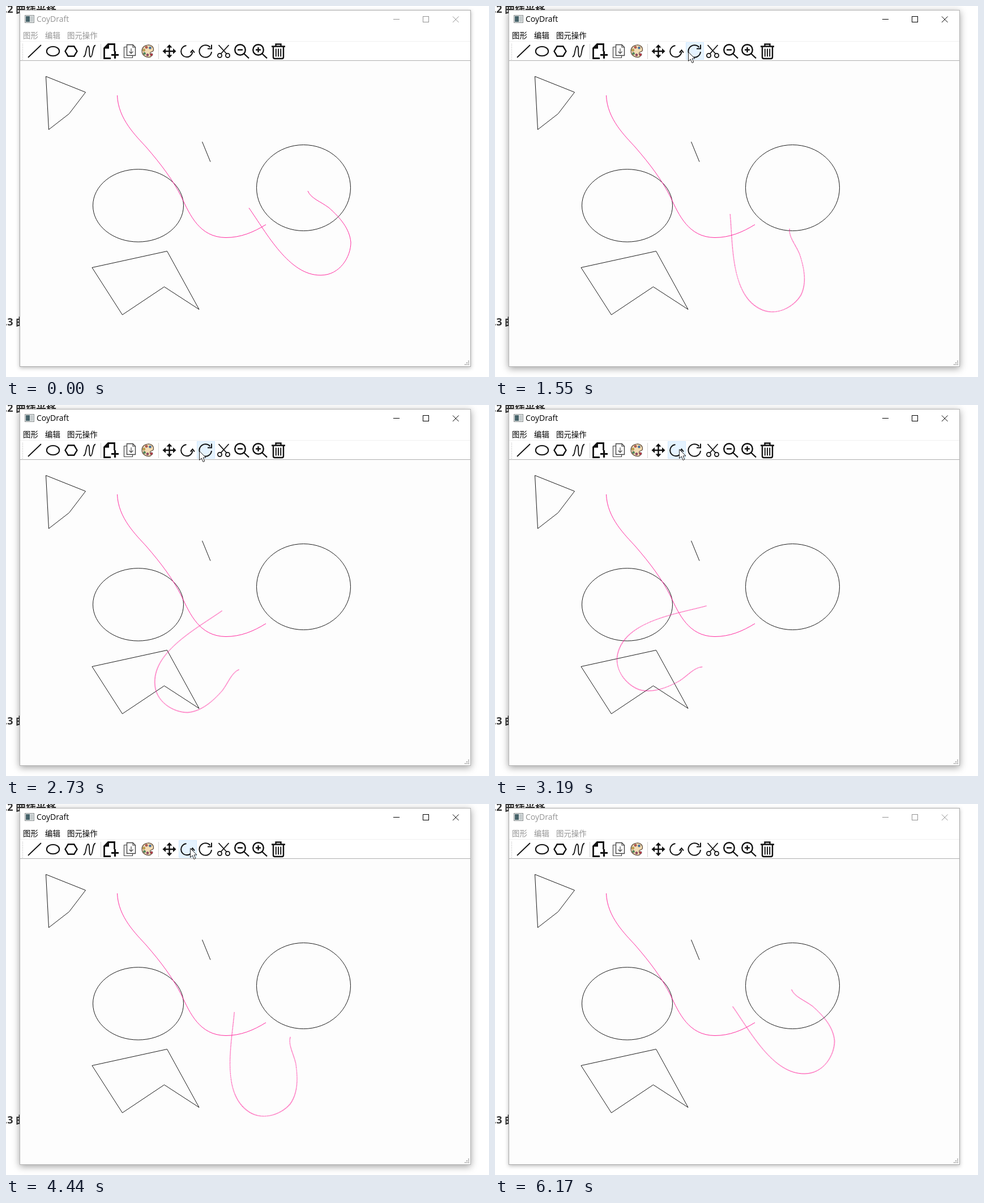
Write an HTML page that moves like this. It is 853 px wide and 656 px high and loops after 6250 ms.

```html
<!DOCTYPE html>
<html lang="zh-CN">
<head>
<meta charset="utf-8">
<title>CoyDraft</title>
<style>
  html, body { margin: 0; width: 100%; height: 100%; overflow: hidden; background: #fff; }
  body { position: relative; font-family: "Open Sans", "Noto Sans CJK SC", "Noto Sans CJK", sans-serif; }
  svg { position: absolute; left: 0; top: 0; display: block; }
  .win {
    position: absolute; left: 24px; top: 7px; width: 795px; height: 629px;
    background: #fff; border: 1px solid #aaa;
  }
  .heading { font-size: 18px; font-weight: 700; fill: #333; }
  .title { font-size: 14px; }
  .menu { font-size: 13.4px; }
  .label { fill: currentColor; }
  .caption { stroke: currentColor; fill: none; shape-rendering: crispEdges; }
  .icons { fill: none; stroke: #111; stroke-width: 2; }
  .solid { fill: #111; stroke: none; }
  .drawing { fill: none; stroke: #000; stroke-width: .9; }
  .pink { stroke: #ff1493; }

  .win, .chrome, .turn, .back, .hover, .press, .cursor {
    animation-duration: 6.25s;
    animation-timing-function: step-end;
    animation-iteration-count: infinite;
  }
  .win { animation-name: lift; }
  .chrome { animation-name: focus; }
  .turn { animation-name: turn; transform-origin: 402px 336.7px; }
  .back { animation-name: back; transform-origin: 397.6px 340.4px; }
  .hover { animation-name: hover; }
  .press { animation-name: press; }
  .cursor { animation-name: cursor; }

  @keyframes lift {
    0%, 98.72% { border-color: #aaa; box-shadow: 0 2px 7px rgba(0,0,0,.27); }
    12.48% { border-color: #b4b4b4; box-shadow: 0 3px 12px rgba(0,0,0,.38); }
  }
  @keyframes focus {
    0%, 98.72% { color: #949494; }
    12.48% { color: #000; }
  }
  /* eleven clockwise clicks, then eleven the other way */
  @keyframes turn {
    0% { transform: rotate(0deg); }
    16.16% { transform: rotate(10deg); }
    21.12% { transform: rotate(20deg); }
    24.8% { transform: rotate(30deg); }
    28.64% { transform: rotate(40deg); }
    31.04% { transform: rotate(50deg); }
    33.44% { transform: rotate(60deg); }
    36% { transform: rotate(70deg); }
    38.72% { transform: rotate(80deg); }
    43.68% { transform: rotate(90deg); }
    47.36% { transform: rotate(100deg); }
    49.92%, 100% { transform: rotate(110deg); }
  }
  @keyframes back {
    0% { transform: rotate(0deg); }
    54.88% { transform: rotate(-10deg); }
    57.28% { transform: rotate(-20deg); }
    59.68% { transform: rotate(-30deg); }
    62.4% { transform: rotate(-40deg); }
    65.92% { transform: rotate(-50deg); }
    68.64% { transform: rotate(-60deg); }
    71.04% { transform: rotate(-70deg); }
    73.6% { transform: rotate(-80deg); }
    78.4% { transform: rotate(-90deg); }
    80.96% { transform: rotate(-100deg); }
    84.8%, 100% { transform: rotate(-110deg); }
  }
  @keyframes hover {
    0%, 85.92%, 100% { transform: translate(-60px, 0); }
    11.2% { transform: translate(337px, 64px); }
    51.04% { transform: translate(305px, 64px); }
  }
  @keyframes press {
    0%, 16.16%, 21.12%, 24.8%, 31.04%, 33.44%, 36%, 38.72%, 43.68%, 47.36%, 49.92%,
    54.88%, 57.28%, 59.68%, 62.4%, 71.04%, 73.6%, 78.4%, 80.96%, 84.8%, 100% { visibility: hidden; }
    13.6%, 18.56%, 22.24%, 25.92%, 32.32%, 34.72%, 37.44%, 40%, 44.96%, 48.64%,
    53.6%, 56%, 58.56%, 61.12%, 63.52%, 72.32%, 74.72%, 79.68%, 82.24% { visibility: visible; }
  }
  @keyframes cursor {
    0%, 89.76%, 100% { transform: translate(-60px, 0); }
    2.4% { transform: translate(658px, 486px); }
    3.68% { transform: translate(630px, 440px); }
    4.96% { transform: translate(575px, 345px); }
    6.24% { transform: translate(500px, 240px); }
    7.36% { transform: translate(430px, 150px); }
    8.64% { transform: translate(380px, 95px); }
    9.92% { transform: translate(350px, 56px); }
    11.2% { transform: translate(341px, 81px); }
    51.04% { transform: translate(325px, 78px); }
    85.92% { transform: translate(395px, 165px); }
    87.2% { transform: translate(560px, 345px); }
    88.48% { transform: translate(768px, 567px); }
  }
</style>
</head>
<body>
<svg width="853" height="656">
  <g class="heading">
    <text x="-3" y="12">.2 曲线平移</text>
    <text x="-3" y="564.5">.3 曲线旋转</text>
  </g>
</svg>

<div class="win"></div>

<svg width="853" height="656">
  <!-- title bar and menu -->
  <g class="chrome">
    <g class="label">
      <text class="title" x="54" y="28">CoyDraft</text>
      <g class="menu">
        <text x="30" y="57">图形</text>
        <text x="69" y="57">编辑</text>
        <text x="108" y="57">图元操作</text>
      </g>
    </g>
    <path class="caption" d="M684 23.5H695M736.5 18.5H746.5V28.5H736.5Z"/>
    <path d="M789 18.5L799.5 29M799.5 18.5L789 29" stroke="currentColor"/>
  </g>
  <rect x="33.5" y="16.5" width="16" height="13" fill="#e4e8e8" stroke="#8a8f90"/>
  <rect x="35" y="18" width="7" height="10" fill="#47636a"/>
  <rect x="43" y="18" width="5" height="10" fill="#c6cccd"/>

  <!-- toolbar -->
  <g fill="none" shape-rendering="crispEdges">
    <path d="M25 62.5H820" stroke="#f0f0f0"/>
    <path d="M25 96.5H820" stroke="#b0b0b0"/>
    <path d="M167.5 67V94M269.5 67V94" stroke="#d4d4d4"/>
    <path d="M29.5 67V95" stroke="#aaa" stroke-dasharray="1 2"/>
  </g>
  <g class="hover">
    <rect x=".5" y=".5" width="31" height="30" fill="#e5f3ff" stroke="#d3eaff"/>
    <rect class="press" x=".5" y=".5" width="31" height="30" fill="#c9e4fb" stroke="#99cdf8"/>
  </g>

  <g class="icons">
    <path d="M39 91L62 69" stroke-width="1.8"/>
    <ellipse cx="83" cy="80" rx="11.2" ry="8.3"/>
    <path d="M104.5 80L109.7 71.3H120.3L125.5 80L120.3 88.7H109.7Z" stroke-width="2.4"/>
    <path d="M136.500 89.500C142 91 140.500 71 145 71C149 71 145.500 90 149.500 90C154 90 152 70.500 158 69.500" stroke-width="1.8"/>

    <path d="M185 92.5H173.500V74.500L180.500 67.500H191.500V80" stroke-width="2.8"/>
    <path class="solid" d="M173 75.500V74L180 67H182V75.500Z"/>
    <path d="M186 86.500H199M192.500 80V93" stroke-width="3.2"/>

    <g stroke="#444" stroke-width="1.4">
      <path d="M213.500 68.500H224L228.500 73V87.500H213.500Z"/>
      <path d="M224 68.500V73H228.500M213 72.500H208.500V91.500H223.500V88" stroke-width="1.2"/>
      <path d="M221 75V84M217.500 80.500L221 84L224.500 80.500" stroke-width="1.2"/>
    </g>

    <path d="M250 69C257 68 261 73 260.500 78C260 82 255 80 254.500 83C254 86 258 87 256 89.500C252 92 240 90 240 79.500C240 73 245 69.500 250 69Z"
      fill="#f3dcb4" stroke="#5d4939" stroke-width="1.2"/>
    <g stroke="#444" stroke-width=".6">
      <circle cx="248" cy="73" r="2.1" fill="#d9534a"/>
      <circle cx="254.500" cy="74" r="2" fill="#3e7fc4"/>
      <circle cx="243.500" cy="78" r="2" fill="#e7b93c"/>
      <circle cx="244.500" cy="84" r="2" fill="#4b9b60"/>
      <circle cx="250" cy="86.500" r="2" fill="#a83f6b"/>
      <circle cx="257" cy="86" r="2.2" fill="#c23b48"/>
    </g>

    <path d="M280 80H297M288.500 71.500V88.500" stroke-width="2.4"/>
    <path class="solid" d="M276.500 80L282 75V85ZM300.500 80L295 75V85ZM288.500 68L283.500 73.500H293.500ZM288.500 92L283.500 86.500H293.500Z"/>

    <path d="M318.500 70A10.200 10.200 0 1 0 329.500 81"/>
    <path d="M325.800 82.500L329.500 78L333 82.500"/>

    <path d="M363 81A10.800 10.800 0 1 1 360.500 73"/>
    <path d="M363 68.500V75.500H356"/>

    <g stroke-width="1.8">
      <circle cx="377.500" cy="87.500" r="3.600"/>
      <circle cx="391.500" cy="87.500" r="3.600"/>
      <path d="M375.500 69L389.500 84.500M393.500 69L379.500 84.500"/>
    </g>

    <g id="lens" stroke-width="2.4">
      <circle cx="413.500" cy="77.500" r="9.300"/>
      <path d="M420.500 84.500L429 92.500M409 77.500H418"/>
    </g>
    <use href="#lens" x="32"/>
    <path d="M445.500 73V82" stroke-width="2.4"/>

    <path d="M469 71.500H493M476.500 71V67.500H485.500V71M472 72V90.500Q472 93 474.500 93H487.500Q490 93 490 90.500V72" stroke-width="2.4"/>
    <path d="M476.800 75.500V89.500M481 75.500V89.500M485.200 75.500V89.500" stroke-width="1.9"/>
  </g>

  <!-- canvas -->
  <rect x="25" y="97" width="795" height="539" fill="#fdfdfd"/>
  <g class="drawing">
    <path d="M70.500 124.500L140.500 152.500L111.500 190.500L75.500 218.500Z"/>
    <path d="M346.500 240L361 275.500"/>
    <ellipse cx="233.500" cy="352.900" rx="80" ry="64.200"/>
    <ellipse cx="525.500" cy="321.500" rx="83" ry="76"/>
    <path d="M152 462.500L284.500 433.500L341 536.500L279.500 496.500L205.500 546Z"/>
    <path class="pink" d="M196.500 158C198 200 230 230 248 250C274 280 295 308 310 338C325 370 342 409 388 409.500C415 409.500 437 400 459 386.500"/>
    <g class="back">
      <g class="turn">
        <path class="pink" d="M429 357C460 401 500 477 556 476C590 476 609 443 609 418C607 394 590 374 570 356.500C556 346 538 340 533 327"/>
      </g>
    </g>
  </g>

  <path d="M816 628H818M813 631H815M816 631H818M810 634H812M813 634H815M816 634H818" stroke="#b0b0b0" stroke-width="2"/>

  <g class="cursor">
    <circle class="press" cx="1" cy="1" r="14.500" fill="#f8f032" fill-opacity=".6"/>
    <path d="M.5 .5V16.500L4.300 13L7 19.500L9.800 18.300L7.100 12H12Z" fill="#fff" stroke="#222"/>
  </g>
</svg>
</body>
</html>
```
